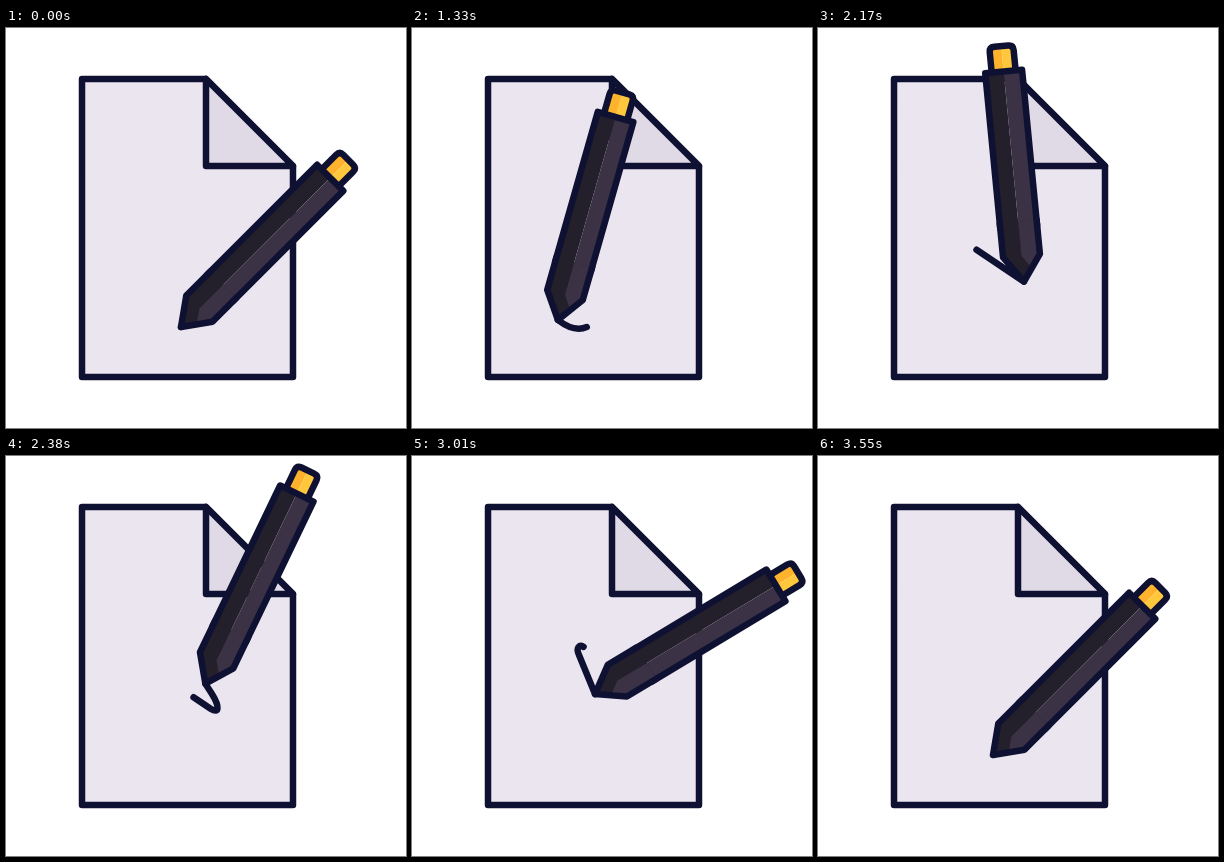
These frames come from a looping animation (400 px wide and 400 px high, 3.58 s). An HTML page without scripts:

```html
<!DOCTYPE html>
<html lang="en">
<head>
<meta charset="utf-8">
<title>Writing pen</title>
<style>
@property --tip { syntax: "<length>"; inherits: true; initial-value: 0px; }
@property --tail { syntax: "<length>"; inherits: true; initial-value: 0px; }
@property --turn { syntax: "<angle>"; inherits: true; initial-value: 45deg; }
@property --squash { syntax: "<length>"; inherits: true; initial-value: 0px; }

html, body { margin: 0; width: 100%; height: 100%; overflow: hidden; background: #fff; }

svg {
  display: block;
  width: 400px;
  height: 400px;
  stroke-width: 6.5;
  stroke-linejoin: round;
  stroke-linecap: round;
  --line: path("M175 299C166 303 155 299 146 292C122 275 103 245 103 215C103 207 107 203 114 202C124 200 136 207 147 214L205 253C213 258 214 251 206 238C196 222 184 205 173 192C169 188 163 190 167 199L183 238C190 256 199 294 175 299");
  animation: write 3580ms linear infinite;
}

.ink { stroke: #0f1133; }
.open { fill: none; }
.dark { fill: #231f2b; }
.light { fill: #3b3246; }

/* The ink runs from --tail to --tip along the line. */
.trail {
  d: var(--line);
  stroke-dasharray: calc(var(--tip) - var(--tail)) 999px;
  stroke-dashoffset: calc(0px - var(--tail));
}
.pen { offset-path: var(--line); offset-distance: var(--tip); offset-rotate: 0deg; }
.tilt { transform: rotate(var(--turn)); }
.shaft { transform: translateY(var(--squash)); }

@keyframes write {
  0%, 28.77% { --tip: 0px; --tail: 0px; --turn: 45deg; --squash: 0px; }
  32.96% { --tip: 11px; --tail: 0px; --turn: 35deg; --squash: 0px; }
  37.15% { --tip: 31px; --tail: 0px; --turn: 16deg; --squash: 0px; }
  43.02% { --tip: 93px; --tail: 52px; --turn: -14deg; --squash: 7px; }
  47.21% { --tip: 139px; --tail: 90px; --turn: -30deg; --squash: 16px; }
  50.56% { --tip: 178px; --tail: 123px; --turn: -36.7deg; --squash: 21px; }
  54.75% { --tip: 207px; --tail: 153px; --turn: -31deg; --squash: 13px; }
  58.10% { --tip: 230px; --tail: 174px; --turn: -18deg; --squash: 4px; }
  60.61% { --tip: 248px; --tail: 191px; --turn: -5.7deg; --squash: 0px; }
  67.32% { --tip: 288px; --tail: 231px; --turn: 30deg; --squash: 0px; }
  74.02% { --tip: 328px; --tail: 271px; --turn: 55.6deg; --squash: 0px; }
  79.05% { --tip: 355px; --tail: 300px; --turn: 60deg; --squash: 0px; }
  84.08% { --tip: 385px; --tail: 329px; --turn: 59deg; --squash: 0px; }
  88.27% { --tip: 410px; --tail: 358px; --turn: 56deg; --squash: 0px; }
  93.58% { --tip: 437px; --tail: 400px; --turn: 50deg; --squash: 0px; }
  99.16%, 100% { --tip: 458px; --tail: 458px; --turn: 45deg; --squash: 0px; }
}
</style>
</head>
<body>
<svg viewBox="0 0 400 400">
  <path class="ink" fill="#ebe5f0" d="M76 51H200L287 138V349H76Z"/>
  <path class="ink" fill="#e0dae6" d="M200 51V138H287Z"/>
  <path class="ink open trail"/>
  <g class="pen">
    <g class="tilt">
      <g class="shaft">
        <path fill="#ffb32c" d="M-12-211V-236H0V-211Z"/>
        <path fill="#ffc73c" d="M0-211V-236H12V-211Z"/>
        <path class="ink open" d="M-12-211V-231.500Q-12-236.500-7-236.500H7Q12-236.500 12-231.500V-211"/>
        <path class="dark" d="M-18.500-50V-211H0V-50Z"/>
        <path class="light" d="M0-50V-211H18.500V-50Z"/>
        <path class="ink open" d="M-18.500-55V-211H18.500V-55"/>
      </g>
      <path class="dark" d="M-18.500-60V-26L0 0L18.500-26V-60Z"/>
      <path class="light" d="M0-60V-26L9-13L18.500-26V-60Z"/>
      <path class="ink open" d="M-18.500-60V-26L0 0L18.500-26V-60"/>
    </g>
  </g>
</svg>
</body>
</html>
```
